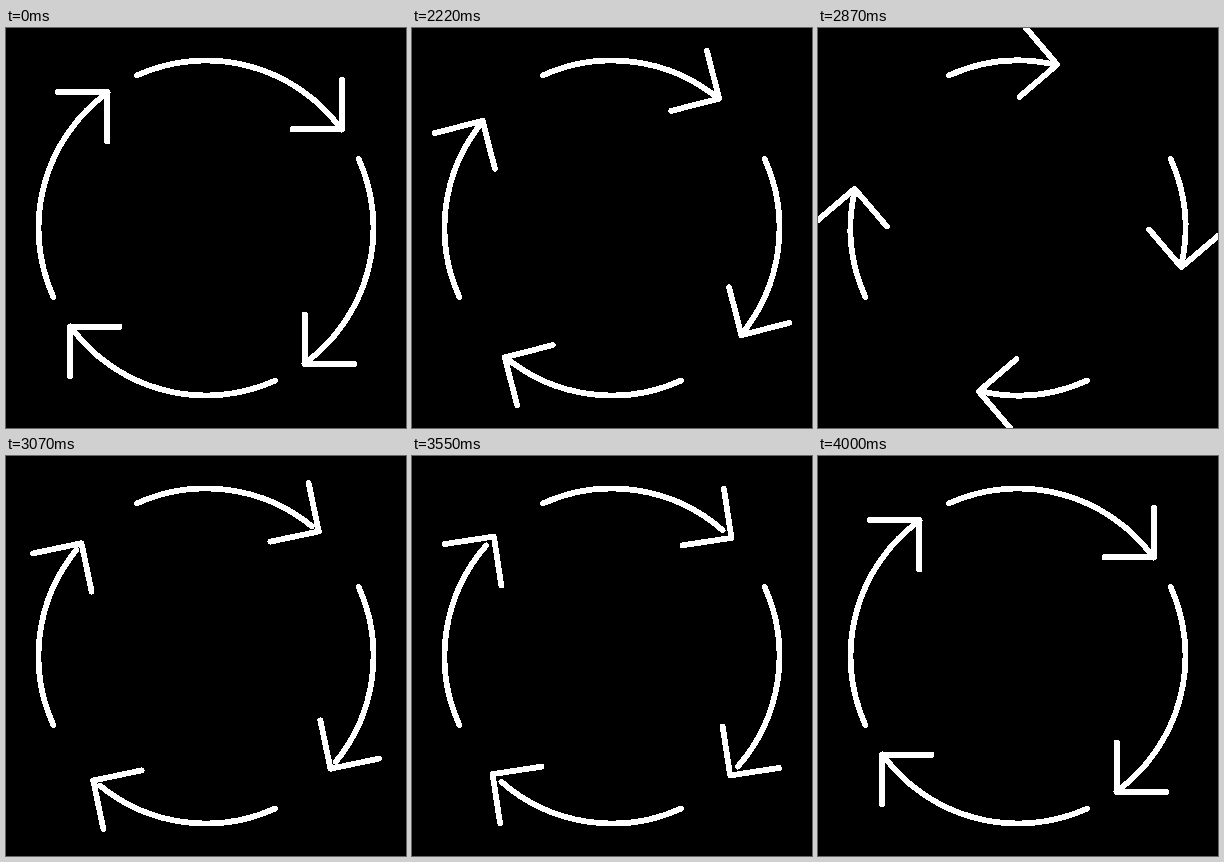
These frames come from a looping animation (400 by 400 pixels, 4020 ms). An HTML page:

```html
<!DOCTYPE html>
<html lang="en">
<head>
<meta charset="utf-8">
<title>Cycle arrows</title>
<style>
  html, body { margin: 0; width: 100%; height: 100%; overflow: hidden; background: #000; }
  svg { display: block; width: 100vw; height: 100vh; }
</style>
</head>
<body>
<svg viewBox="0 0 400 400">
  <g id="ring" transform="translate(200 200)" fill="none" stroke="#fff"
     stroke-width="5.8" stroke-linecap="round" stroke-linejoin="round"
     shape-rendering="crispEdges"></g>
</svg>
<script>
const LOOP = 4020;
const RADIUS = 167.5;
const HEAD_RADIUS = 168;
const ARM = 49.5;
const TAIL = -24.3; // degrees clockwise from the top
const HEAD_TILT = -9;

// time in ms, angle of the head, angle where the arc ends
const KEYS = [
  [2000, 54, 54],
  [2655, -2.2, -2.2],
  [3288, 58, 54],
  [3610, 44.2, 40.2],
  [4000, 54, 54]
];

const ring = document.getElementById('ring');

function add(parent, tag, attrs) {
  const el = document.createElementNS(ring.namespaceURI, tag);
  for (const name in attrs) el.setAttribute(name, attrs[name]);
  parent.appendChild(el);
  return el;
}

const k = ARM * Math.SQRT1_2;
const arrows = [0, 90, 180, 270].map(turn => {
  const g = add(ring, 'g', { transform: `rotate(${turn})` });
  return {
    arc: add(g, 'path', {}),
    head: add(g, 'path', { d: `M${-k} ${-k}L0 0L${-k} ${k}` })
  };
});

function point(deg) {
  const a = deg * Math.PI / 180;
  return `${RADIUS * Math.sin(a)} ${-RADIUS * Math.cos(a)}`;
}

function pose(t) {
  if (t <= KEYS[0][0]) return KEYS[0].slice(1);
  const i = KEYS.findIndex(key => t < key[0]);
  if (i < 0) return KEYS[KEYS.length - 1].slice(1);
  const a = KEYS[i - 1], b = KEYS[i];
  const p = (1 - Math.cos(Math.PI * (t - a[0]) / (b[0] - a[0]))) / 2;
  return [1, 2].map(n => a[n] + (b[n] - a[n]) * p);
}

function draw() {
  const [tip, end] = pose(performance.now() % LOOP);
  const d = `M${point(TAIL)}A${RADIUS} ${RADIUS} 0 0 1 ${point(end)}`;
  const place = `rotate(${tip}) translate(0 ${-HEAD_RADIUS}) rotate(${HEAD_TILT})`;
  for (const { arc, head } of arrows) {
    arc.setAttribute('d', d);
    head.setAttribute('transform', place);
  }
  requestAnimationFrame(draw);
}
draw();
</script>
</body>
</html>
```
